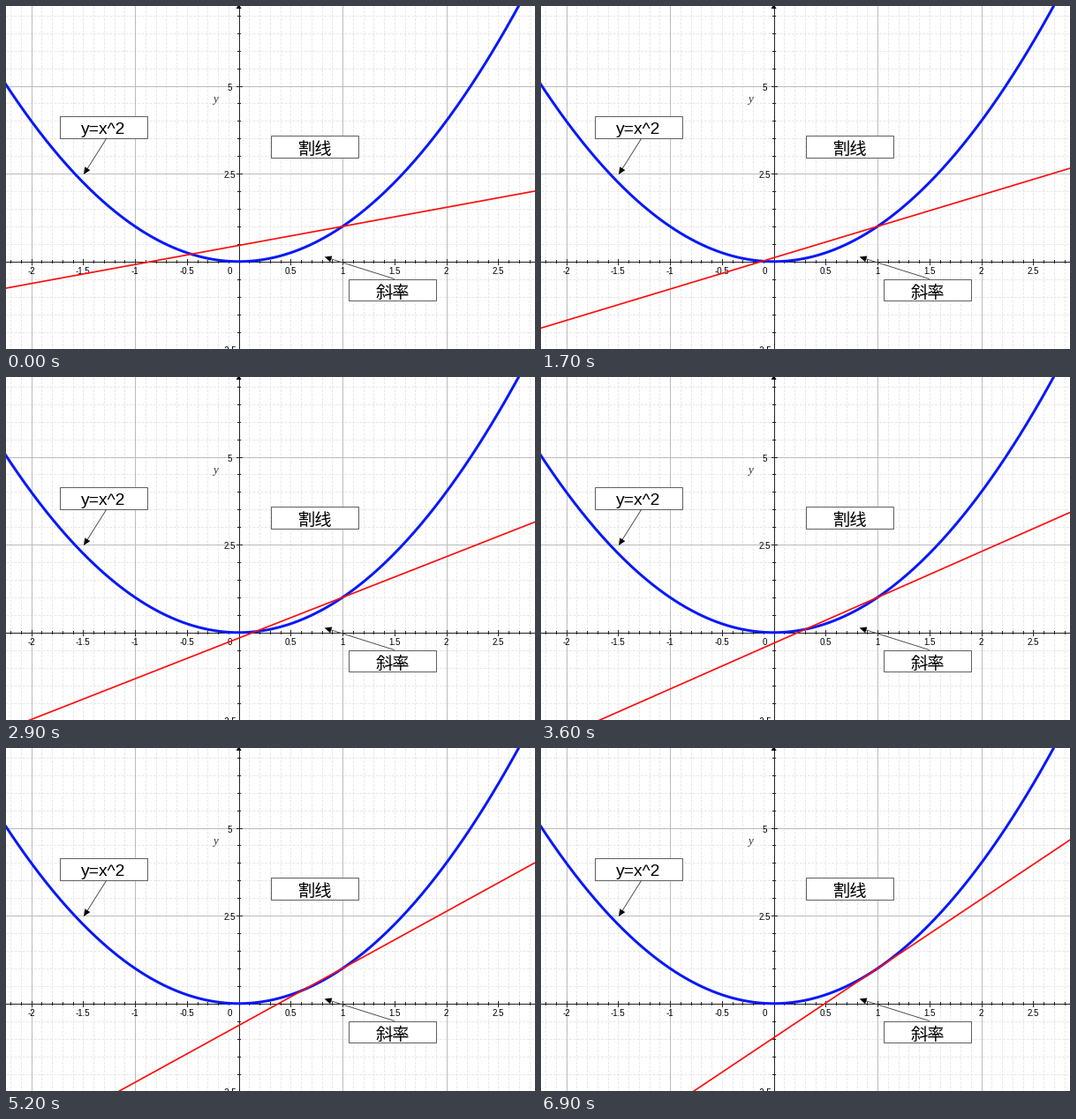
Recreate the animation shown at these times as a matplotlib script. Size 599 by 389 pixels, loop 7 s.

```python
import numpy as np
import matplotlib.pyplot as plt
from matplotlib.animation import FuncAnimation
from matplotlib.patches import Polygon, Rectangle

W, H, DPI = 599, 389, 100
PT = 72 / DPI                      # points per pixel
X0, Y0, UX, UY = 263.6, 289.8, 117.5, 39.85
FRAMES, STEP = 70, 100

plt.rcParams["axes.unicode_minus"] = False
fig = plt.figure(figsize=(W / DPI, H / DPI), dpi=DPI, facecolor="white")
ax = fig.add_axes([0, 0, 1, 1])
ax.set_xlim(0, W)
ax.set_ylim(H, 0)
ax.axis("off")


def px(x):
    return X0 + UX * x


def py(y):
    return Y0 - UY * y


def stroke(xs, ys, color, width, z, **kw):
    return ax.plot(xs, ys, color=color, lw=width * PT, zorder=z, **kw)[0]


def label(x, y, s, size, font="Liberation Sans", **kw):
    kw = {"ha": "center", "va": "center", "color": "black", **kw}
    ax.text(x, y, s, fontsize=size * PT, family=font, zorder=4, **kw)


def arrow(start, tip, length=8, half=3.6, z=7):
    start, tip = np.array(start, float), np.array(tip, float)
    d = (tip - start) / np.hypot(*(tip - start))
    side = np.array([-d[1], d[0]]) * half
    base = tip - d * length
    stroke([start[0], base[0]], [start[1], base[1]], "#444444", 0.9, z)
    ax.add_patch(Polygon([tip, base + side, base - side], fc="black",
                         ec="none", zorder=z))


def box(x, y, s, w=99, h=24.5, font="Noto Sans CJK JP"):
    ax.add_patch(Rectangle((x, y), w, h, fc="white", ec="#606060",
                           lw=PT, zorder=3))
    label(x + w / 2 + 0.3, y + h / 2 + 0.8, s, 19.3, font,
          va="center_baseline")


def draw_grid():
    dash = (0, (3, 1.5))
    for i in range(-22, 29):
        x = px(i / 10)
        if i % 10:
            stroke([x, x], [0, H], "#e8e8e8", 1, 0, ls=dash)
        else:
            stroke([x, x], [0, H], "#bcbcbc", 1, 1)
        t = 3 if i % 5 == 0 else 1.6
        stroke([x, x], [Y0 - t, Y0 + t], "#222222", 1, 2)
    for j in range(-4, 15):
        y = py(j / 2)
        if j % 5:
            stroke([0, W], [y, y], "#e8e8e8", 1, 0, ls=dash)
        else:
            stroke([0, W], [y, y], "#bcbcbc", 1, 1)
        t = 3 if j % 5 == 0 else 1.6
        stroke([X0 - t, X0 + t], [y, y], "#222222", 1, 2)


def draw_axes():
    stroke([0, W], [Y0, Y0], "#222222", 1, 2)
    stroke([X0, X0], [0, H], "#222222", 1, 2)
    ax.add_patch(Polygon([(X0, -2), (X0 - 3, 3), (X0 + 3, 3)],
                         fc="black", ec="none", zorder=2))
    for k in range(-4, 6):
        x = px(k / 2) if k else 253
        label(x, 301, f"{k / 2:g}", 9.8)
    for v in (5, 2.5, -2.5):
        label(253, py(v) + 2, f"{v:g}", 9.8)
    label(237, 106, "y", 13, "Liberation Serif", style="italic",
          color="#333333")


draw_grid()
draw_axes()

xs = np.linspace(-2.3, 2.8, 300)
stroke(px(xs), py(xs ** 2), "#0818fa", 3, 5)

box(60.6, 125.4, "y=x^2", font="Liberation Sans")
box(300.4, 147.4, "割线")
box(388.4, 309.9, "斜率")
arrow((113.6, 150.4), (88, 191))
arrow((439.4, 309.4), (360.6, 284.5))

secant = stroke([], [], "#ff0c0c", 1.7, 6)

# x of the moving intersection; the other one stays at (1, 1)
KEYS = [0, 7, 17, 29, 42, 52, 69]
MOVING_X = [-0.458, -0.303, -0.108, 0.158, 0.429, 0.622, 0.972]


def update(n):
    slope = 1 + np.interp(n, KEYS, MOVING_X)
    ends = np.array([-2.4, 3.0])
    secant.set_data(px(ends), py(1 + slope * (ends - 1)))
    return [secant]


anim = FuncAnimation(fig, update, frames=FRAMES, interval=STEP,
                     repeat=True, repeat_delay=0, blit=False)
plt.show()
```
